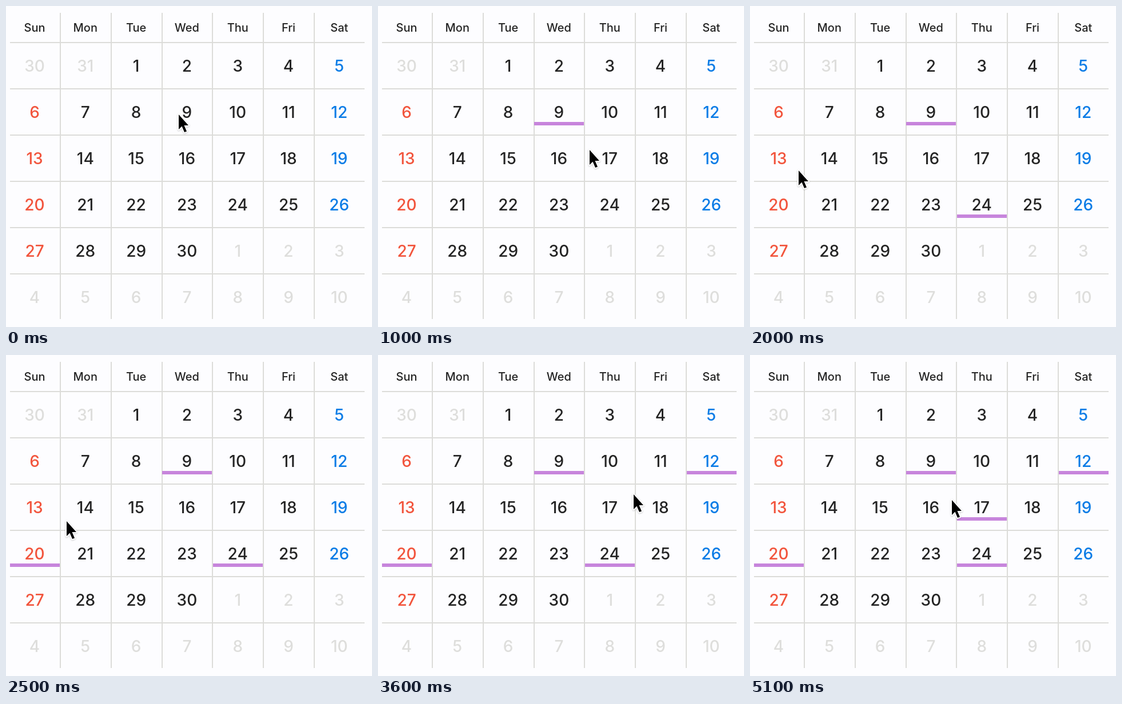
These frames come from a looping animation (640 px wide and 562 px high, 5200 ms). An HTML page:

```html
<!DOCTYPE html>
<html lang="en">
<head>
<meta charset="utf-8">
<title>Calendar</title>
<style>
  html, body { margin: 0; width: 100%; height: 100%; overflow: hidden; background: #fdfdff; }
  svg { display: block; width: 100%; height: 100%; }
  text { font: 500 28px Inter, sans-serif; text-anchor: middle; fill: #242424; }
  .head { font-size: 20px; }
  .sun { fill: #f2553d; }
  .sat { fill: #0a7ce6; }
  .out { fill: #dededc; }
  .line { fill: #dcdcd9; }
  .bar { fill: #c785dc; }
  #cursor { fill: #000; stroke: #fff; stroke-width: 4px; stroke-linejoin: round; paint-order: stroke;
    filter: drop-shadow(0 1px 1px #0003); }
</style>
</head>
<body>
<svg viewBox="0 0 640 562">
  <g id="grid"></g>
  <path id="cursor" d="M1 1V27L6.5 21.5L11 32L15 30.5L10.5 20H18Z"/>
</svg>
<script>
const LOOP = 5200, STEP = 100;
const COL = 88.8, ROW = 80.9;
const grid = document.getElementById('grid');
const cursor = document.getElementById('cursor');

function add(tag, attrs, content = '') {
  const node = document.createElementNS('http://www.w3.org/2000/svg', tag);
  for (const name in attrs) node.setAttribute(name, attrs[name]);
  node.textContent = content;
  return grid.appendChild(node);
}

const centerX = col => 50 + col * COL;
const centerY = row => 105 + row * ROW;

// Day 1 is the third cell of the first week
const cellOf = day => ({ col: (day + 1) % 7, row: Math.floor((day + 1) / 7) });

for (let i = 0; i < 6; i++) {
  add('rect', { x: 7, y: Math.round(63.4 + i * ROW), width: 620, height: 2, class: 'line' });
  add('rect', { x: Math.round(94 + i * COL), y: 12, width: 2, height: 536, class: 'line' });
}

['Sun', 'Mon', 'Tue', 'Wed', 'Thu', 'Fri', 'Sat'].forEach((name, col) =>
  add('text', { x: centerX(col), y: 44.5, class: 'head' }, name));

// Pointer path: it passes through points and clicks on days
const pass = (time, x, y) => ({ time, x, y });

function click(time, day) {
  const { col, row } = cellOf(day);
  const x = centerX(col), y = centerY(row);
  const bar = add('rect', { x: Math.round(x - 43), y: Math.round(y + 17), width: 87, height: 6, class: 'bar' });
  return { time, x, y, bar };
}

const path = [
  pass(0, 301, 189), click(400, 9),
  pass(1000, 369, 251), click(1400, 24),
  pass(2000, 84, 287), click(2200, 20),
  pass(2500, 105, 290), click(3100, 12),
  pass(3600, 446, 243), click(4100, 17),
  pass(4500, 422, 263), pass(5100, 352, 253)
];

for (let day = -1; day <= 40; day++) {
  const { col, row } = cellOf(day);
  const outside = day < 1 || day > 30;
  const label = day < 1 ? day + 31 : outside ? day - 30 : day;
  const kind = outside ? 'out' : col === 0 ? 'sun' : col === 6 ? 'sat' : '';
  add('text', { x: centerX(col), y: centerY(row) + 10, class: kind }, label);
}

const slope = (i, axis) => (path[i + 1][axis] - path[i][axis]) / (path[i + 1].time - path[i].time);

// Rest at turning points, pass smoothly through the others
function tangent(i, axis) {
  if (i === 0 || i === path.length - 1) return 0;
  const a = slope(i - 1, axis), b = slope(i, axis);
  return a * b > 0 ? 2 * a * b / (a + b) : 0;
}

function pointerAt(time, axis) {
  const next = path.findIndex(key => key.time >= time && key.time > 0);
  const from = path[next - 1], to = path[next];
  const span = to.time - from.time;
  const u = (time - from.time) / span, v = 1 - u;
  return v * v * (1 + 2 * u) * from[axis] + u * u * (3 - 2 * u) * to[axis] +
    span * u * v * (v * tangent(next - 1, axis) - u * tangent(next, axis));
}

function draw() {
  const time = Math.floor(performance.now() % LOOP / STEP) * STEP;
  cursor.setAttribute('transform', `translate(${pointerAt(time, 'x')} ${pointerAt(time, 'y')})`);
  for (const { time: start, bar } of path)
    bar?.setAttribute('visibility', time >= start ? 'visible' : 'hidden');
  requestAnimationFrame(draw);
}
draw();
</script>
</body>
</html>
```
